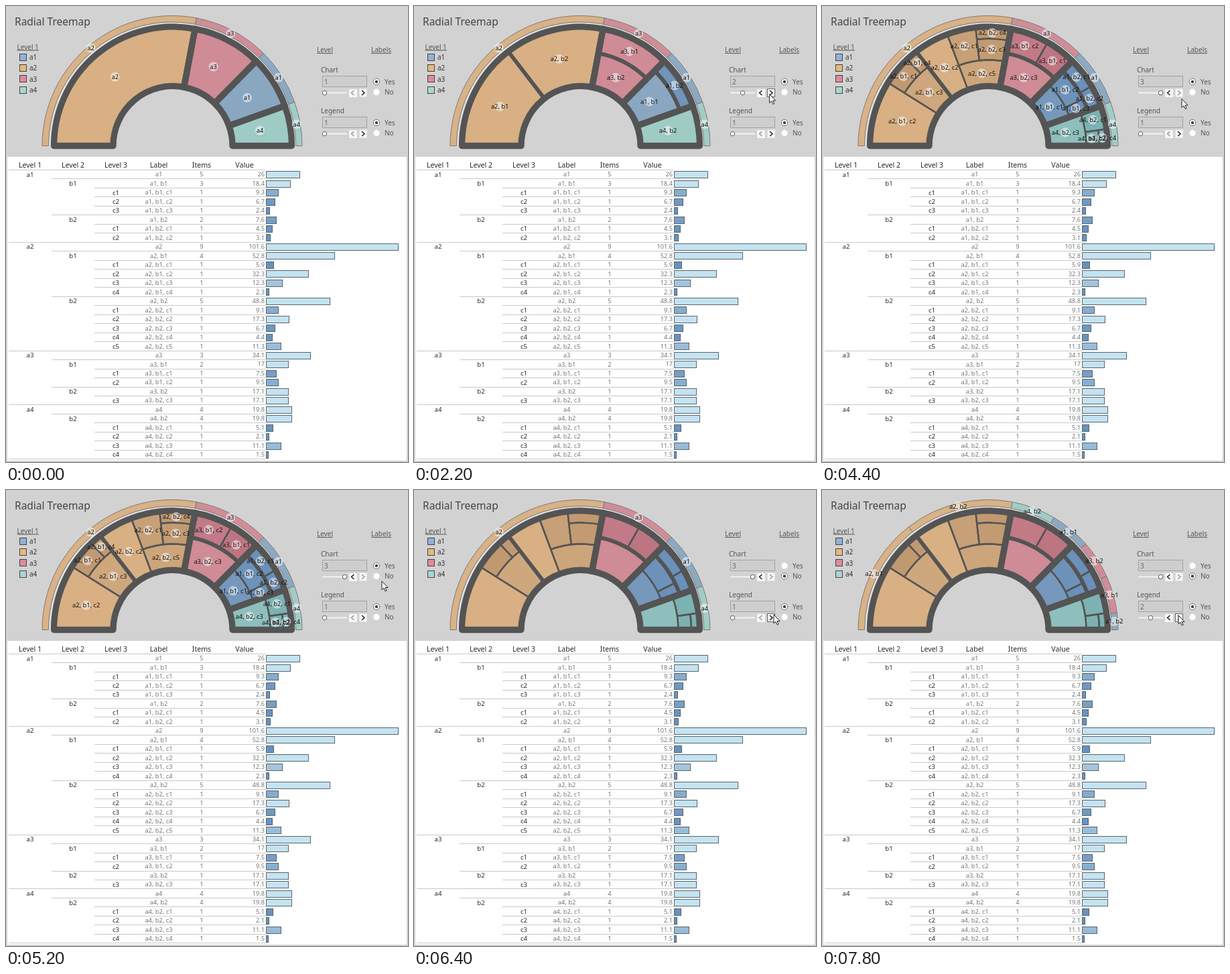
Animation, 600 px wide and 680 px high, one loop 8000 ms. Source, as an HTML page:

```html
<!DOCTYPE html>
<html lang="en">
<head>
<meta charset="utf-8">
<title>Radial Treemap</title>
<style>
html, body { margin: 0; width: 100%; height: 100%; overflow: hidden; background: #d3d2d3; }
svg { display: block; width: 600px; height: 680px; font-family: "Noto Sans", "Open Sans", sans-serif; }
</style>
</head>
<body>
<svg id="stage" viewBox="0 0 600 680"></svg>
<script>
const DATA = {
  a1: { b1: { c1: 9.3, c2: 6.7, c3: 2.4 }, b2: { c1: 4.5, c2: 3.1 } },
  a2: { b1: { c1: 5.9, c2: 32.3, c3: 12.3, c4: 2.3 }, b2: { c1: 9.1, c2: 17.3, c3: 6.7, c4: 4.4, c5: 11.3 } },
  a3: { b1: { c1: 7.5, c2: 9.5 }, b2: { c3: 17.1 } },
  a4: { b2: { c1: 5.1, c2: 2.1, c3: 11.1, c4: 1.5 } }
};
// legend swatch, large value, small value
const HUES = {
  a1: ['#92b2d6', [138, 167, 194], [107, 144, 185]],
  a2: ['#e4b97f', [216, 176, 132], [193, 153, 113]],
  a3: ['#e08b99', [207, 139, 150], [187, 113, 126]],
  a4: ['#a8d6d2', [159, 203, 197], [124, 178, 178]]
};
const BAR = [[196, 227, 241], [104, 146, 190]];
const LOOP = 8000, CX = 249, CY = 208.5, R0 = 89, R1 = 177.5;
const LABEL_CX = 247.7, RING_CX = 248;
const DARK = '#545454';

// ---- hierarchy ----
function makeNode(name, content, path = []) {
  const names = [...path, name];
  const leaf = typeof content === 'number';
  const kids = leaf ? [] : Object.entries(content).map(([k, v]) => makeNode(k, v, names));
  const sum = key => kids.reduce((s, k) => s + k[key], 0);
  return {
    name, kids, label: names.join(', '), root: names[0], depth: names.length,
    value: leaf ? content : sum('value'), items: leaf ? 1 : sum('items')
  };
}
const roots = Object.entries(DATA).map(([k, v]) => makeNode(k, v));
const flatten = nodes => nodes.flatMap(n => [n, ...flatten(n.kids)]);
const rows = flatten(roots);
const atDepth = d => rows.filter(n => n.depth === d);
const byValue = nodes => [...nodes].sort((p, q) => q.value - p.value);
const total = nodes => nodes.reduce((s, n) => s + n.value, 0);

// Cut the largest node off along the longer side, keeping areas proportional.
function layout(nodes, box) {
  if (!nodes.length) return;
  const [first, ...rest] = byValue(nodes);
  const { a0, a1, r0, r1 } = box, share = first.value / total(nodes);
  let own, left;
  if ((a1 - a0) * (r0 + r1) / 2 > r1 - r0) {
    const a = a0 + (a1 - a0) * share;
    own = { ...box, a1: a };
    left = { ...box, a0: a };
  } else {
    const r = Math.sqrt(r0 * r0 + (r1 * r1 - r0 * r0) * share);
    own = { ...box, r1: r };
    left = { ...box, r0: r };
  }
  first.box = own;
  layout(first.kids, own);
  layout(rest, left);
}
layout(roots, { a0: 0, a1: Math.PI, r0: R0, r1: R1 });

// ---- drawing helpers ----
const polar = (r, a, cx = CX) => [cx - r * Math.cos(a), CY - r * Math.sin(a)].map(v => +v.toFixed(2));
const mix = (p, q, k) => `rgb(${p.map((v, i) => Math.round(v + (q[i] - v) * k))})`;
const shade = (pair, value) => mix(pair[0], pair[1], Math.min(1, Math.max(0, (16 - value) / 10)));
const hue = n => shade(HUES[n.root].slice(1), n.value);

function sector({ a0, a1, r0, r1 }, cx) {
  return `M${polar(r0, a0, cx)}L${polar(r1, a0, cx)}A${r1} ${r1} 0 0 1 ${polar(r1, a1, cx)}` +
    `L${polar(r0, a1, cx)}A${r0} ${r0} 0 0 0 ${polar(r0, a0, cx)}Z`;
}
const middle = (b, cx) => polar((b.r0 + b.r1) / 2, (b.a0 + b.a1) / 2, cx);
const path = (d, fill, stroke, width) =>
  `<path d="${d}" fill="${fill}" stroke="${stroke}" stroke-width="${width}" stroke-linejoin="round"/>`;
const rect = (x, y, w, h, fill, stroke = 'none') =>
  `<rect x="${x}" y="${y}" width="${w}" height="${h}" fill="${fill}" stroke="${stroke}"/>`;
const line = (x0, x1, y, color) => `<path d="M${x0} ${y}H${x1}" stroke="${color}"/>`;
const text = (s, x, y, size, fill, anchor = 'start', extra = '') =>
  `<text x="${x}" y="${(y + size * 0.36).toFixed(2)}" font-size="${size}" fill="${fill}" text-anchor="${anchor}" ${extra}>${s}</text>`;
const group = (id, body) => `<g id="${id}">${body}</g>`;
const UNDERLINE = 'text-decoration="underline"';

function badges(spots) {
  return spots.map(([, [x, y]]) => `<circle cx="${x}" cy="${y}" r="7" fill="#fff" fill-opacity=".5"/>`).join('') +
    spots.map(([s, [x, y]]) => text(s, x, y, 9.3, '#111', 'middle')).join('');
}

function chart(level) {
  let out = atDepth(level).map(n => path(sector(n.box), hue(n), 'none', 0)).join('');
  for (let d = level; d > 0; d--)
    out += atDepth(d).map(n => path(sector(n.box), 'none', DARK, [9.3, 5.5, 2.4][d - 1])).join('');
  return out;
}
const chartLabels = level => badges(atDepth(level).map(n => [n.label, middle(n.box, LABEL_CX)]));

function ring(level) {
  const nodes = byValue(atDepth(level)), sum = total(nodes);
  let a = 0, out = '';
  const spots = nodes.map(n => {
    const box = { a0: a, a1: a += Math.PI * n.value / sum, r0: 184.5, r1: 194 };
    out += path(sector(box, RING_CX), mix(HUES[n.root][1], [255, 255, 255], 0.02), '#7d7a78', 1);
    return [n.label, middle(box, RING_CX - 0.7)];
  });
  return out + badges(spots);
}

function table() {
  const pitch = 13.48, top = 244.5;
  let out = rect(2, 225, 596, 453, '#fff');
  ['Level 1', 'Level 2', 'Level 3', 'Label', 'Items', 'Value'].forEach((s, i) => {
    out += text(s, 36 + 64 * i, 237, 10.6, '#2a2a2a', 'middle');
  });
  rows.forEach((n, i) => {
    const y = top + pitch * i, mid = y + 6.6;
    out += line(4 + 64 * (n.depth - 1), 388, Math.floor(y) + 0.5, '#c9c9c9');
    out += text(n.name, 36 + 64 * (n.depth - 1), mid, 9.6, '#2a2a2a', 'middle');
    out += text(n.label, 228, mid, 9.3, '#777', 'middle');
    out += text(n.items, 292, mid, 9.3, '#777', 'middle');
    out += text(+n.value.toFixed(1), 386, mid, 9.2, '#777', 'end');
    out += rect(388.5, Math.round(mid - 5) + 0.5, Math.round(n.value * 1.94), 10, shade(BAR, n.value), '#59656e');
  });
  return out + line(4, 388, 675.5, '#c9c9c9');
}

function legend() {
  return text('Level 1', 16.5, 61, 10, '#555', 'start', UNDERLINE) +
    roots.map((n, i) => rect(20.5, Math.round(71 + 16.2 * i) + 0.5, 10, 10, HUES[n.name][0], '#444') +
      text(n.name, 35, 76.5 + 16.2 * i, 10, '#333')).join('');
}

// ---- interactive parts ----
const chevron = (x, y, dir, on) =>
  `<path d="M${x - 2 * dir} ${y - 3.5}L${x + 2 * dir} ${y}L${x - 2 * dir} ${y + 3.5}" fill="none" stroke="${on ? '#222' : '#999'}" stroke-width="1.5"/>`;

function radio(y, on, label) {
  return `<circle cx="553" cy="${y}" r="4.7" fill="#fff" stroke="${on ? '#777' : '#e6e6e6'}"/>` +
    (on ? `<circle cx="553" cy="${y}" r="2.2" fill="#444"/>` : '') + text(label, 565, y, 10, '#555');
}

function control(title, y, level, yes, hover, pressed) {
  const track = y + 34.5, knob = [475.5, 490.5, 505.5][level - 1];
  return text(title, 470, y, 10, '#555') +
    rect(472.5, y + 9.5, 66, 16, '#cfcecf', '#a3a3a3') + text(level, 475, y + 18, 10, '#666') +
    rect(472, track - 1, 37, 2, '#f4f4f4') +
    `<circle cx="${knob}" cy="${track}" r="3.2" fill="#fff" stroke="#555"/>` +
    rect(512, y + 29, 12, 12, '#f6f6f6') + chevron(517.5, track, -1, level > 1) +
    rect(527.5, y + 28.5, 11, 12, pressed ? '#d6d6d6' : '#f6f6f6', hover ? '#666' : 'none') +
    chevron(533, track, 1, level < 3) +
    radio(y + 18, yes, 'Yes') + radio(y + 33.5, !yes, 'No');
}

const CURSOR = [
  [500, 570, 215], [1300, 529, 131], [2100, 529, 131], [2400, 535, 133], [2700, 535, 133], [2800, 534, 133],
  [4300, 534, 133], [4400, 537, 138.5], [5200, 561, 136], [5400, 558, 131], [5900, 558, 131],
  [6400, 537, 186], [6600, 535, 187], [6800, 535, 187], [7100, 532, 187], [LOOP, 532, 187]
];
function cursorAt(t) {
  const i = CURSOR.findIndex(k => k[0] >= t);
  if (i <= 0) return CURSOR[0].slice(1);
  const [t0, x0, y0] = CURSOR[i - 1], [t1, x1, y1] = CURSOR[i];
  let k = (t - t0) / (t1 - t0);
  k = k * k * (3 - 2 * k);
  return [x0 + (x1 - x0) * k, y0 + (y1 - y0) * k];
}

const stage = document.getElementById('stage');
const levels = [1, 2, 3];
stage.innerHTML =
  rect(0, 0, 600, 680, '#d3d2d3') +
  text('Radial Treemap', 13, 23.5, 15.5, '#444') + legend() + table() +
  `<path d="M${polar(182.5, 0, 248.5)}A182.5 182.5 0 0 1 ${polar(182.5, Math.PI, 248.5)}" fill="none" stroke="#e3e3e3" stroke-width="2.5"/>` +
  levels.map(l => group('chart' + l, chart(l))).join('') +
  levels.slice(0, 2).map(l => group('ring' + l, ring(l))).join('') +
  levels.map(l => group('labels' + l, chartLabels(l))).join('') +
  text('Level', 464, 65.5, 10, '#555', 'start', UNDERLINE) +
  text('Labels', 545, 65.5, 10, '#555', 'start', UNDERLINE) +
  group('controls', '') +
  group('cursor', path('M0 0V13L3 10.2L5.2 15L7.2 14L5 9.5H9Z', '#fff', '#222', 1));

const el = id => document.getElementById(id);
const show = (id, on) => el(id).setAttribute('visibility', on ? 'visible' : 'hidden');
const stepped = (t, ...times) => 1 + times.filter(s => t >= s).length;
let lastControls = '';

function render(now) {
  const t = Math.floor(now % LOOP / 100) * 100;
  const chartLevel = stepped(t, 1900, 3600), ringLevel = stepped(t, 7400);
  const labelled = t < 5700;
  for (const l of levels) {
    show('chart' + l, l === chartLevel);
    show('labels' + l, l === chartLevel && labelled);
    if (l < 3) show('ring' + l, l === ringLevel);
  }
  const [x, y] = cursorAt(t), visible = t >= 500;
  const over = top => visible && x >= 526 && x <= 540 && y >= top && y <= top + 14;
  const controls =
    control('Chart', 95, stepped(t, 1800, 3600), labelled, over(123), t >= 3300 && t < 3600) +
    control('Legend', 156, stepped(t, 7300), true, over(184), false);
  if (controls !== lastControls) el('controls').innerHTML = lastControls = controls;
  show('cursor', visible);
  el('cursor').setAttribute('transform', `translate(${x.toFixed(1)} ${y.toFixed(1)})`);
}

const start = performance.now();
function tick() {
  render(performance.now() - start);
  requestAnimationFrame(tick);
}
tick();
</script>
</body>
</html>
```
